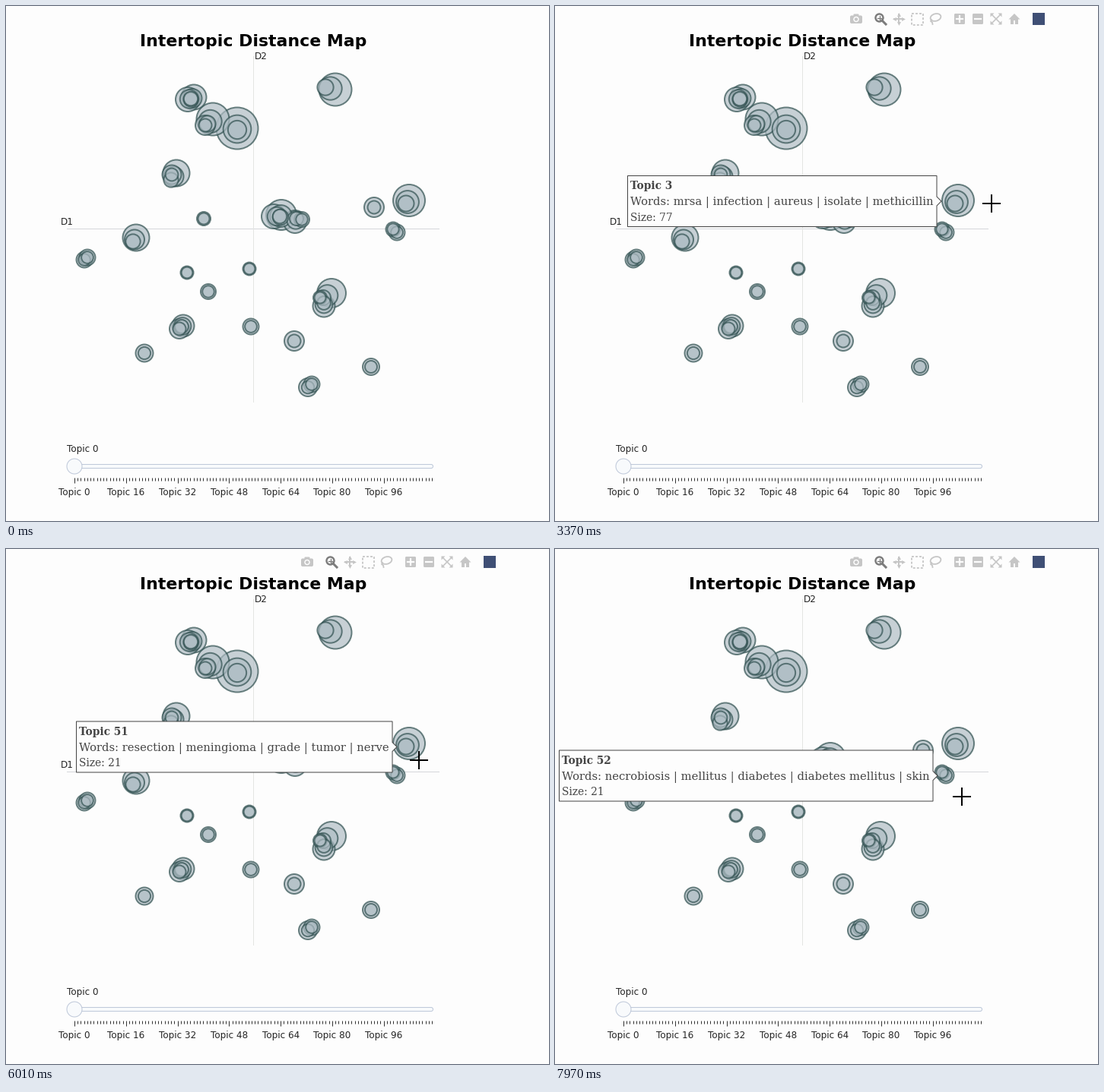
Write a matplotlib script that moves like this. It is 714 px wide and 678 px high and loops after 8000 ms.

```python
import numpy as np
import matplotlib.pyplot as plt
from matplotlib.animation import FuncAnimation
from matplotlib.collections import PatchCollection
from matplotlib.patches import Circle, Ellipse, FancyBboxPatch, Polygon, Rectangle

W, H, DPI = 714, 678, 100
LOOP, STEP = 8000, 40
PT = 72 / DPI

PAGE = "#fdfdfd"
INK = "#242424"
TIP_INK = "#444444"
ICON = "#c6c6c6"
ICON_ON = "#7c7c7c"
SLIDER = "#bec8d9"
FILL = (0.69, 0.745, 0.773, 0.7)
EDGE = (0.184, 0.31, 0.31, 0.7)

# Nests of bubbles: centre and radius of the outer one, drift to the innermost
NESTS = [
    (304, 161, 28.5, 0, 2), (272, 149, 22.5, -7, 6), (247, 120, 17.5, -4, 3),
    (239, 123, 17, 4, -1), (433, 110, 22.5, -13, -3), (224, 220, 18.5, -7, 9),
    (530, 256, 22, -4, 4), (362, 275, 21, -1, 3), (352, 277, 17, 8, 0),
    (380, 284, 16, 2, -4), (171, 305, 18.5, -4, 5), (428, 378, 20, -11, 6),
    (418, 395, 15.5, 0, -4), (233, 421, 15.5, -2, 1),
]
# Concentric pairs: centre and outer radius
PAIRS = [
    (262, 157, 14), (218, 222, 13.5), (484, 265, 14), (389, 281, 11), (260, 280, 10),
    (103, 334, 11.5), (107, 331, 11.5), (514, 298, 11.5), (509, 294, 10.5),
    (238, 351, 9.5), (320, 346, 9.5), (266, 376, 11), (413, 384, 10), (228, 425, 14),
    (322, 422, 11.5), (379, 441, 14), (182, 457, 12.5), (480, 475, 12),
    (397, 502, 13), (402, 498, 11.5),
]

# Hover labels: start in ms, tip of the box, topic, size, words
LABELS = [
    (3290, 508, 257, 3, 77, "mrsa | infection | aureus | isolate | methicillin"),
    (4350, 514, 260.5, 51, 21, "resection | meningioma | grade | tumor | nerve"),
    (6300, 499, 294, 81, 16, "wrist | test | tenosynovitis | median nerve | extensor"),
    (7740, 503, 298.5, 52, 21,
     "necrobiosis | mellitus | diabetes | diabetes mellitus | skin"),
]

# Pointer stops: time, x, y
STOPS = [
    (2380, 692, 520), (2760, 583, 472), (3340, 574, 260), (3760, 581, 222),
    (4240, 553, 268), (4640, 551, 278), (6000, 543, 278), (6700, 527, 308),
    (7400, 523, 310), (7960, 535, 326),
]
CROSS = 2620  # the arrow turns into a crosshair

fig = plt.figure(figsize=(W / DPI, H / DPI), dpi=DPI, facecolor=PAGE)
ax = fig.add_axes([0, 0, 1, 1])
ax.set_xlim(0, W)
ax.set_ylim(H, 0)
ax.axis("off")


def text(x, y, s, px, color=INK, **kw):
    kw.setdefault("family", "DejaVu Sans")
    return ax.text(x, y, s, fontsize=px * PT, color=color, va="baseline", **kw)


def line(xs, ys, color, px=1, z=5, **kw):
    return ax.plot(xs, ys, color=color, lw=px * PT, zorder=z, **kw)[0]


def shape(patch, fill=ICON, edge="none", px=1.0, z=5):
    patch.set(facecolor=fill, edgecolor=edge, linewidth=px * PT, zorder=z)
    return ax.add_patch(patch)


def rounded(x, y, w, h, r):
    return FancyBboxPatch((x, y), w, h, boxstyle=f"round,pad=0,rounding_size={r}")


def nest(x, y, r, dx=0, dy=0, n=3):
    """Bubbles shrinking from the outer one towards its drifted core."""
    core = 6 + r / 4
    return [(x + k * dx, y + k * dy, r * (core / r) ** k) for k in np.linspace(0, 1, n)]


def draw_bubbles():
    bubbles = [b for row in NESTS for b in nest(*row)]
    bubbles += [b for row in PAIRS for b in nest(*row, n=2)]
    bubbles.sort(key=lambda b: -b[2])
    discs = [Circle((x, y), r - 1) for x, y, r in bubbles]
    ax.add_collection(PatchCollection(discs, facecolor=FILL, edgecolor=EDGE,
                                      linewidth=2 * PT, zorder=2))


def draw_chart():
    text(325, 53, "Intertopic Distance Map", 22, "black", weight="bold", ha="center")
    text(72, 288, "D1", 12)
    text(327, 70, "D2", 12)
    line([80, 569], [292.5] * 2, "#d4d6da", z=1)
    line([324.5] * 2, [66, 521], "#e4e5e2", z=1)
    draw_bubbles()


def draw_slider():
    text(80, 587, "Topic 0", 12)
    shape(rounded(82.5, 603.5, 479, 5, 2.5), "#f8fafc", SLIDER)
    shape(Circle((90, 606), 10), "#f8fafc", SLIDER, z=6)
    n = np.arange(112)
    ticks = 90 + 4.236 * n
    ax.vlines(ticks, 621, np.where(n % 16, 625, 628), colors="#333333", lw=PT)
    for k in n[::16]:
        text(ticks[k], 644, f"Topic {k}", 12, ha="center")


def draw_toolbar():
    # camera
    shape(rounded(388, 12.5, 16, 10.5, 2))
    shape(rounded(392.5, 10.5, 7, 5, 1))
    shape(Circle((396, 17.5), 3), ICON, PAGE, 1.5)
    # zoom
    shape(Circle((426.5, 15.5), 5), "none", ICON_ON, 2.4)
    line([430, 435], [19, 24], ICON_ON, 3)
    line([424, 429], [15.5] * 2, ICON_ON, 1.3)
    line([426.5] * 2, [13, 18], ICON_ON, 1.3)
    # pan
    line([446, 458], [17, 17], ICON, 2)
    line([452, 452], [11, 23], ICON, 2)
    for marker, dx, dy in ((">", 6, 0), ("<", -6, 0), ("v", 0, 6), ("^", 0, -6)):
        line([452 + dx], [17 + dy], ICON, marker=marker, ms=5 * PT, mew=0)
    # box select
    shape(Rectangle((468.5, 9.5), 15, 15), "none", ICON, 1.8).set_linestyle((0, (1.6, 1.2)))
    # lasso
    shape(Ellipse((500.5, 15), 14, 9.5, angle=-15), "none", ICON, 1.8)
    line([495, 494, 496, 496.5], [18, 20, 21.5, 24], ICON, 1.8)
    # zoom in and out
    for x in (532, 556):
        shape(rounded(x - 7, 10, 14, 14, 1.5))
        line([x - 4, x + 4], [17, 17], PAGE, 2.2, 6)
    line([532, 532], [13, 21], PAGE, 2.2, 6)
    # autoscale
    for sx in (-1, 1):
        line([580 - 6 * sx, 580 + 6 * sx], [11, 23], ICON, 1.6)
        for sy in (-1, 1):
            cx, cy = 580 + 7.5 * sx, 17 + 7.5 * sy
            shape(Polygon([(cx, cy), (cx - 5 * sx, cy), (cx, cy - 5 * sy)]))
    # home
    shape(Polygon([(596.5, 17.5), (604, 10), (611.5, 17.5)]))
    shape(Rectangle((599, 17), 10, 6.5))
    shape(Rectangle((602.7, 19), 2.6, 4.5), PAGE, z=6)
    shape(Rectangle((628, 9), 16, 16), "#3f4f75")
    return shape(Rectangle((380, 2), 272, 29), PAGE, z=8)


def make_label(tip, cy, topic, size, words):
    kw = dict(family="DejaVu Serif", zorder=11)
    right = tip - 6
    body = text(right - 4.5, cy + 5, f"Words: {words}", 14.7, TIP_INK, ha="right", **kw)
    x = body.get_window_extent().x0
    left, top, bottom = round(x - 4) + 0.5, cy - 33.5, cy + 33.5
    box = Polygon([(left, top), (right, top), (right, cy - 6), (tip, cy),
                   (right, cy + 6), (right, bottom), (left, bottom)])
    return [shape(box, PAGE, TIP_INK, 1, 10), body,
            text(x, cy - 16, f"Topic {topic}", 13.8, TIP_INK, weight="bold", **kw),
            text(x, cy + 26, f"Size: {size}", 13.8, TIP_INK, **kw)]


def pointer(t):
    """Eased position between the stops around time t."""
    times, xs, ys = np.transpose(STOPS)
    k = np.interp(t, times, np.arange(len(times)))
    u = k % 1
    k = k - u + u * u * (3 - 2 * u)
    return [round(np.interp(k, np.arange(len(times)), v)) for v in (xs, ys)]


draw_chart()
draw_slider()
cover = draw_toolbar()
labels = [make_label(*row[1:]) for row in LABELS]
starts = [row[0] for row in LABELS] + [LOOP]

ARROW = np.array([(0, 0), (0, 17), (4, 13), (6.5, 19), (9, 18), (6.5, 12), (12, 12)])
arrow = shape(Polygon(ARROW), "white", "black", 1, 20)
bars = [line([0, 0], [0, 0], "black", 2, 20, solid_capstyle="butt") for _ in range(2)]


def update(i):
    t = i * STEP
    cover.set_alpha(1 - np.clip((t - 2560) / 180, 0, 1))

    for parts, start, end in zip(labels, starts, starts[1:]):
        for part in parts:
            part.set_visible(start <= t < end)

    x, y = pointer(t)
    arrow.set_visible(STOPS[0][0] <= t < CROSS)
    arrow.set_xy(ARROW + (x - 6, y - 9))
    bars[0].set_data([x - 12, x + 12], [y, y])
    bars[1].set_data([x, x], [y - 12, y + 12])
    for bar in bars:
        bar.set_visible(t >= CROSS)
    return [cover, arrow, *bars]


anim = FuncAnimation(fig, update, frames=LOOP // STEP, interval=STEP,
                     repeat=True, repeat_delay=0)
plt.show()
```
